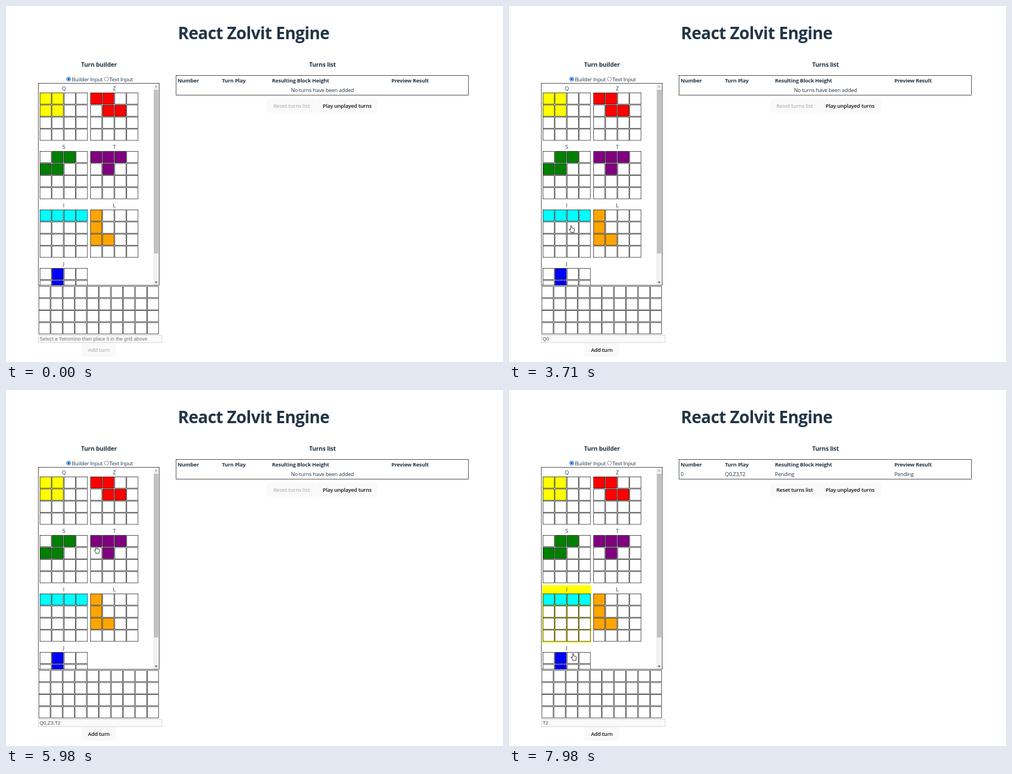
Write an HTML page that moves like this. It is 884 by 633 pixels and loops after 8 s.

```html
<!DOCTYPE html>
<html lang="en">
<head>
<meta charset="utf-8">
<title>React Zolvit Engine</title>
<style>
  html, body { margin: 0; width: 100%; height: 100%; overflow: hidden; background: #fff; }
  svg { display: block; width: 100%; height: 100%; }
  text { font: 9.4px "Open Sans", "Noto Sans", sans-serif; letter-spacing: -.018em; fill: #213547; white-space: pre; }
  .title { font-size: 29.6px; font-weight: 700; letter-spacing: -.019em; }
  .head { font-size: 10.75px; font-weight: 700; }
  .th { font-weight: 700; }
  .btn { font-weight: 600; fill: #101010; }
  .btn.off { fill: #b7b7b7; }
  .field { font: 8.88px "Liberation Sans", Arial, sans-serif; letter-spacing: 0; fill: #545454; }
  .field.hint { fill: #757575; }
  .mid { text-anchor: middle; }
  .line { stroke: #000; stroke-width: .7; }
</style>
</head>
<body>
<svg id="stage" viewBox="0 0 884 633">
  <defs><clipPath id="panel"><rect x="58" y="138" width="214" height="358.5"/></clipPath></defs>
</svg>
<script>
const stage = document.getElementById('stage');
const LOOP = 8000;

function add(tag, attrs, parent = stage) {
  const el = document.createElementNS('http://www.w3.org/2000/svg', tag);
  for (const k in attrs) el.setAttribute(k, attrs[k]);
  parent.appendChild(el);
  return el;
}
function text(str, x, y, cls = '', parent = stage) {
  const el = add('text', { x, y, class: cls }, parent);
  el.textContent = str;
  return el;
}
const box = (x, y, width, height, fill, parent, rx = 0) =>
  add('rect', { x, y, width, height, fill, rx }, parent);
const frame = (x, y, width, height, fill = 'none', parent) =>
  add('rect', { x, y, width, height, fill, class: 'line' }, parent);
const show = (el, on) => el.setAttribute('visibility', on ? 'visible' : 'hidden');

// Cells repeat at one pitch in the picker and in the placement grid
const PITCH = 21.45, SIDE = 20;
function cells(x, y, columns, fill, parent) {
  return Array.from({ length: columns * 4 }, (_, i) => {
    const c = i % columns, r = Math.floor(i / columns);
    return frame(x + PITCH * c, y + PITCH * r, SIDE, SIDE, fill(c, r), parent);
  });
}

// Occupied cells as "column row" pairs
const PIECES = {
  Q: ['yellow', '00 10 01 11'],
  Z: ['red', '00 10 11 21'],
  S: ['green', '10 20 01 11'],
  T: ['purple', '00 10 20 11'],
  I: ['cyan', '00 10 20 30'],
  L: ['orange', '00 01 02 12'],
  J: ['blue', '10 11 12 02']
};
const paint = (name, c, r) =>
  name && PIECES[name][1].split(' ').includes(`${c}${r}`) ? PIECES[name][0] : '#fff';
function origin(name) {
  const i = Object.keys(PIECES).indexOf(name);
  return [60.5 + 90 * (i % 2), 154.6 + 104 * Math.floor(i / 2)];
}

// Headings
text('React Zolvit Engine', 440.5, 58.5, 'title mid');
text('Turn builder', 165.3, 107.5, 'head mid');
text('Turns list', 563, 107.5, 'head mid');

// Input mode
add('circle', { cx: 111.5, cy: 130, r: 3.6, fill: '#fff', stroke: '#0b63ce' });
add('circle', { cx: 111.5, cy: 130, r: 2.2, fill: '#0b63ce' });
add('circle', { cx: 178.7, cy: 130, r: 3.6, fill: '#fff', stroke: '#767676', 'stroke-width': .8 });
text('Builder Input', 117.2, 134);
text('Text Input', 184, 134);

// Piece picker
const picker = add('g', { 'clip-path': 'url(#panel)' });
const marks = {};
for (const name in PIECES) {
  const [x, y] = origin(name);
  marks[name] = box(x - 1.5, y - 15.6, 87, 102, 'yellow', picker);
  text(name, x + 42.2, y - 4.6, 'mid', picker);
  cells(x, y, 4, (c, r) => paint(name, c, r), picker);
}
box(262, 138, 10, 358, '#f1f1f1', picker);
box(263, 149, 8, 291, '#c1c1c1', picker);
add('path', { d: 'M264.5 144.5h5l-2.5-3z', fill: '#a3a3a3' });
add('path', { d: 'M264.5 490h5l-2.5 3z', fill: '#505050' });
frame(57.5, 137.5, 215, 359);

// Placement grid
const GRID = { x: 58.6, y: 498.7, columns: 10 };
const grid = cells(GRID.x, GRID.y, GRID.columns, () => '#fff');

add('rect', { x: 57.5, y: 585.5, width: 220, height: 13, fill: '#fafafa', stroke: '#d6d6d6' });
const field = text('', 59.7, 595.3, 'field');

// Turns table
frame(302.5, 123.5, 520, 35);
const columns = [305.3, 384, 473, 685.5];
const tableRow = (labels, y, cls, parent) => labels.forEach((s, i) => text(s, columns[i], y, cls, parent));
tableRow(['Number', 'Turn Play', 'Resulting Block Height', 'Preview Result'], 136.3, 'th');
const empty = text('No turns have been added', 562.8, 153.2, 'mid');
const turn = add('g', {});
tableRow(['0', 'Q0,Z3,T2', 'Pending', 'Pending'], 153.2, '', turn);

function button(label, x, y, w) {
  box(x, y, w, 25, '#f9f9f9', stage, 5);
  return text(label, x + w / 2, y + 16.2, 'btn mid');
}
const reset = button('Reset turns list', 464, 165, 88);
button('Play unplayed turns', 552, 165, 109.5);
const addTurn = button('Add turn', 133.5, 599, 63);

// Pointer
const pulse = add('circle', { r: 7.5, fill: '#ffb800', 'fill-opacity': .65 });
const pointer = add('g', { fill: '#fff', stroke: '#000', 'stroke-width': .8, 'stroke-linejoin': 'round' });
const arrow = add('path', { d: 'M0 0V10.6L2.5 8.3L4.2 12.2L5.9 11.4L4.2 7.7H7.6Z' }, pointer);
const hand = add('path', {
  d: 'M-1 1Q0 -.6 1 1V5L2.6 5.1L4.3 5.6L5.6 6.3Q6.2 6.7 6 8.5L5 11V13H-.6V11.6L-3.4 8Q-3.6 6.6 -2.2 7L-1 8.2Z'
}, pointer);

// The pointer reaches each stop at its time; a click takes effect PRESS later
const PRESS = 70, TRAVEL = 600;
const stops = [];
const go = (at, x, y) => stops.push({ at, leave: at, x, y });
const click = (at, x, y, effect) => stops.push({ at: at - PRESS, leave: at, x, y, effect });
function pick(at, name) {
  const [x, y] = origin(name);
  click(at, x + 14, y + 24, s => { s.piece = name; });
}
function drop(at, col) {
  click(at, GRID.x + PITCH * (col + .85), 522, s => {
    s.typed.push(s.piece + col);
    s.piece = '';
  });
}

go(890, 538, 592);
go(960, 535, 570);
go(1350, 311, 349);
go(1550, 260, 367.5);
go(1810, 120, 536);
pick(2200, 'Q');
go(2790, 85, 506);
drop(3300, 0);
pick(4150, 'Z');
drop(4580, 3);
pick(5200, 'T');
drop(5620, 2);
go(5980, 160, 275);
go(6120, 218, 604);
click(6570, 170, 612, s => { s.typed = []; s.added = true; });
pick(7220, 'T');
go(7290, 104, 548);
drop(7480, 2);
pick(7900, 'I');
go(7980, 114, 468);

function locate(t) {
  const i = stops.findIndex(s => s.at > t);
  if (i < 0) return stops[stops.length - 1];
  const a = stops[i - 1], b = stops[i];
  const start = Math.max(a.leave, b.at - TRAVEL);
  const k = Math.max(0, (t - start) / (b.at - start));
  return { x: a.x + (b.x - a.x) * k, y: a.y + (b.y - a.y) * k };
}

function stateAt(t) {
  const state = { piece: '', typed: [], added: false };
  for (const s of stops) if (s.effect && s.leave <= t) s.effect(state);
  return state;
}

function render(t) {
  const live = t >= stops[0].at;
  const { x, y } = live ? locate(t) : { x: 0, y: 0 };
  const { piece, typed, added } = stateAt(t);
  const ready = typed.length > 0;

  for (const name in marks) show(marks[name], name === piece);

  const overGrid = x > 58 && x < 272 && y > 498 && y < 584;
  const col = Math.floor((x - GRID.x) / PITCH);
  grid.forEach((el, i) => {
    const name = overGrid ? piece : '';
    el.setAttribute('fill', paint(name, i % GRID.columns - col, Math.floor(i / GRID.columns)));
  });

  field.textContent = typed.join(',') || 'Select a Tetromino then place it in the grid above';
  field.classList.toggle('hint', !ready);
  addTurn.classList.toggle('off', !ready);
  reset.classList.toggle('off', !added);
  show(empty, !added);
  show(turn, added);

  const onButton = ready && x > 133 && x < 197 && y > 599;
  const isHand = (x < 237 && y > 139 && y < 584) || onButton;
  show(arrow, live && !isHand);
  show(hand, live && isHand);
  pointer.setAttribute('transform', `translate(${x} ${y})`);

  show(pulse, stops.some(s => t >= s.at && t < s.leave));
  pulse.setAttribute('cx', x - .5);
  pulse.setAttribute('cy', y + 1);
}

const begin = performance.now();
function tick() {
  render((performance.now() - begin) % LOOP);
  requestAnimationFrame(tick);
}
tick();
</script>
</body>
</html>
```
